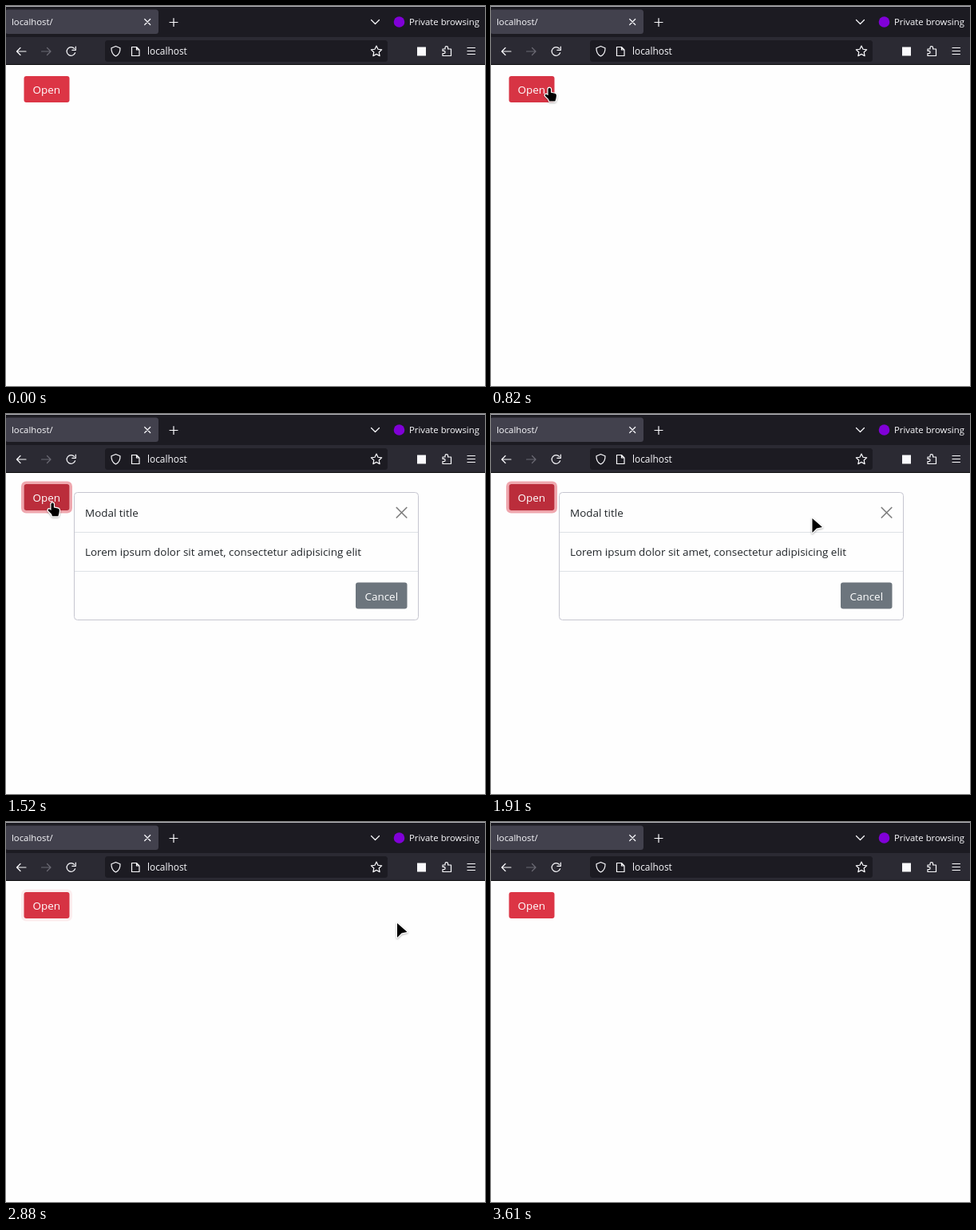
Recreate the animation shown at these times as an HTML page. Size 600x477 px, loop 4.33 s.

```html
<!DOCTYPE html>
<html lang="en">
<head>
<meta charset="utf-8">
<title>Modal dialog</title>
<style>
html, body { margin: 0; height: 100%; overflow: hidden; background: #fefefe; }
svg { display: block; width: 600px; height: 477px; font: 13.45px "Open Sans", "Noto Sans", sans-serif; }
.icons { fill: none; stroke: #fbfbfe; stroke-width: 1.2; stroke-linecap: round; stroke-linejoin: round; }
.chrome { fill: #fbfbfe; font-size: 11.35px; }
#cursor path { stroke: #fff; stroke-width: 2.4; stroke-linejoin: round; paint-order: stroke; }
#cursor { filter: drop-shadow(0 1px 1px rgba(0, 0, 0, .3)); }
</style>
</head>
<body>
<svg viewBox="0 0 600 477">
  <rect width="600" height="477" fill="#fefefe"/>
  <rect width="600" height="1" fill="#b4b4b8"/>
  <rect y="1" width="600" height="38" fill="#1c1b22"/>
  <rect y="39" width="600" height="35" fill="#2b2a33"/>
  <rect y="73" width="600" height="1" fill="#0c0c0d"/>
  <rect x="-1" y="4.5" width="192" height="30.5" rx="3.5" fill="#42414d"/>
  <rect x="124" y="43" width="354" height="27" rx="3.5" fill="#1c1b22"/>

  <g class="icons">
    <path d="M173.7 16.5l7 7m0-7l-7 7"/>
    <path d="M205 20.5h10m-5-5v10"/>
    <path d="M457.5 17.5l5 5 5-5"/>
    <path d="M25 57H13.5m4.5-4.5L13.5 57l4.5 4.5"/>
    <path d="M44.500 57H56m-4.500-4.500L56 57l-4.500 4.500" stroke="#6b6a74"/>
    <path d="M86.600 58.800A5.400 5.400 0 1 1 85.600 53.400M87.300 51v4.400h-4.400"/>
    <path d="M137.500 50.500l5.500 2.200q.3 7.300-5.500 10.300-5.800-3-5.500-10.300z"/>
    <path d="M157.500 51.500h6l3.500 3.500v7.500h-9.500zm6 0v3.500h3.500"/>
    <path id="star"/>
    <path d="M547 54h3v-1.500a1.800 1.800 0 0 1 3.600 0V54h3.900v8.500H547v-3h1.500a1.600 1.600 0 0 0 0-3.200H547z"/>
    <path d="M578 52.500h9.500m-9.500 4h9.500m-9.500 4h9.500"/>
  </g>
  <rect x="515" y="51.500" width="11" height="11" fill="#fbfbfe"/>
  <circle cx="492.500" cy="20" r="6.800" fill="#8000d7"/>
  <g class="chrome">
    <text x="7" y="24">localhost/</text>
    <text x="505" y="24">Private browsing</text>
    <text x="177" y="61" font-size="11.9" style="font-size:11.9px">localhost</text>
  </g>

  <rect id="ring" x="20.750" y="86.250" width="60.500" height="36.500" rx="4.500" fill="none" stroke="#e15361" stroke-width="3.500"/>
  <rect id="button" x="22.500" y="88" width="57" height="33" rx="3"/>
  <text x="33.500" y="110" fill="#fff">Open</text>

  <g id="modal" fill="#212529">
    <rect x="85.500" y="98.500" width="431" height="160" rx="4" fill="#fefefe" stroke="#c6c6d0"/>
    <path d="M86 148.500h430M86 197.500h430" stroke="#dee2e6"/>
    <text x="99" y="129">Modal title</text>
    <text x="99" y="178">Lorem ipsum dolor sit amet, consectetur adipisicing elit</text>
    <path id="close" d="M489.300 117.500l12.500 12.500m0-12.500l-12.500 12.500" stroke="#000" stroke-width="1.700" stroke-linecap="round"/>
    <rect x="438" y="211.500" width="64.500" height="33" rx="3" fill="#6c757d"/>
    <text x="449.500" y="233.500" fill="#fff">Cancel</text>
  </g>

  <g id="cursor">
    <path id="arrow" d="M0 0L12.500 11 5.500 12.500 0 18z"/>
    <path id="hand" d="M-2 1.600a1.700 1.700 0 0 1 3.400 0V6l5 1q2.200.5 2 2.800l-.6 3.700-1 3.200H-.5l-1-2.600-4-4q-1-1.400.4-2.200 1-.5 3.100 1.600z"/>
  </g>
</svg>
<script>
const LOOP = 4330;
const $ = id => document.getElementById(id);
const show = (id, on) => $(id).setAttribute("visibility", on ? "visible" : "hidden");
const within = (t, from, to) => t >= from && t < to;
const ramp = (t, from, to) => Math.min(1, Math.max(0, (t - from) / (to - from)));
const mix = (a, b, k) => a + (b - a) * k;

// Pointer path: time, x, y
const path = [
  [490, -16, 34], [520, 2.5, 31.5], [550, 21, 31], [680, 78, 86], [760, 82, 98],
  [930, 58.5, 111.5], [1560, 58.5, 111.5], [1660, 110, 118], [1910, 402, 131],
  [2050, 465, 131], [2210, 490, 127], [2940, 490, 127], [3000, 500, 126]
];

function pointer(t) {
  const next = path.findIndex(p => p[0] > t);
  if (next < 1) return path[next < 0 ? path.length - 1 : 0].slice(1);
  const [t0, x0, y0] = path[next - 1], [t1, x1, y1] = path[next];
  const k = ramp(t, t0, t1);
  return [mix(x0, x1, k), mix(y0, y1, k)];
}

function draw(t) {
  const dark = ramp(t, 800, 950) - ramp(t, 2760, 2910);
  const tone = [[220, 187], [53, 45], [69, 59]].map(([a, b]) => mix(a, b, dark));
  $("button").setAttribute("fill", `rgb(${tone})`);
  $("ring").setAttribute("opacity", 0.5 * (ramp(t, 1180, 1330) - ramp(t, 2760, 2910)));
  show("modal", within(t, 1280, 2760));
  $("close").setAttribute("opacity", t < 2210 ? 0.5 : 0.75);

  const visible = within(t, 490, 3030);
  const pointing = within(t, 790, 1610) || within(t, 2210, 2790);
  show("arrow", visible && !pointing);
  show("hand", visible && pointing);
  $("cursor").setAttribute("transform", `translate(${pointer(t)})`);
}

const star = Array.from({ length: 10 }, (_, i) => {
  const angle = i * Math.PI / 5, r = i % 2 ? 3.4 : 7;
  return [464 + r * Math.sin(angle), 57 - r * Math.cos(angle)];
});
$("star").setAttribute("d", `M${star.join("L")}z`);

const start = performance.now();
function tick() {
  draw((performance.now() - start) % LOOP);
  requestAnimationFrame(tick);
}
tick();
</script>
</body>
</html>
```
